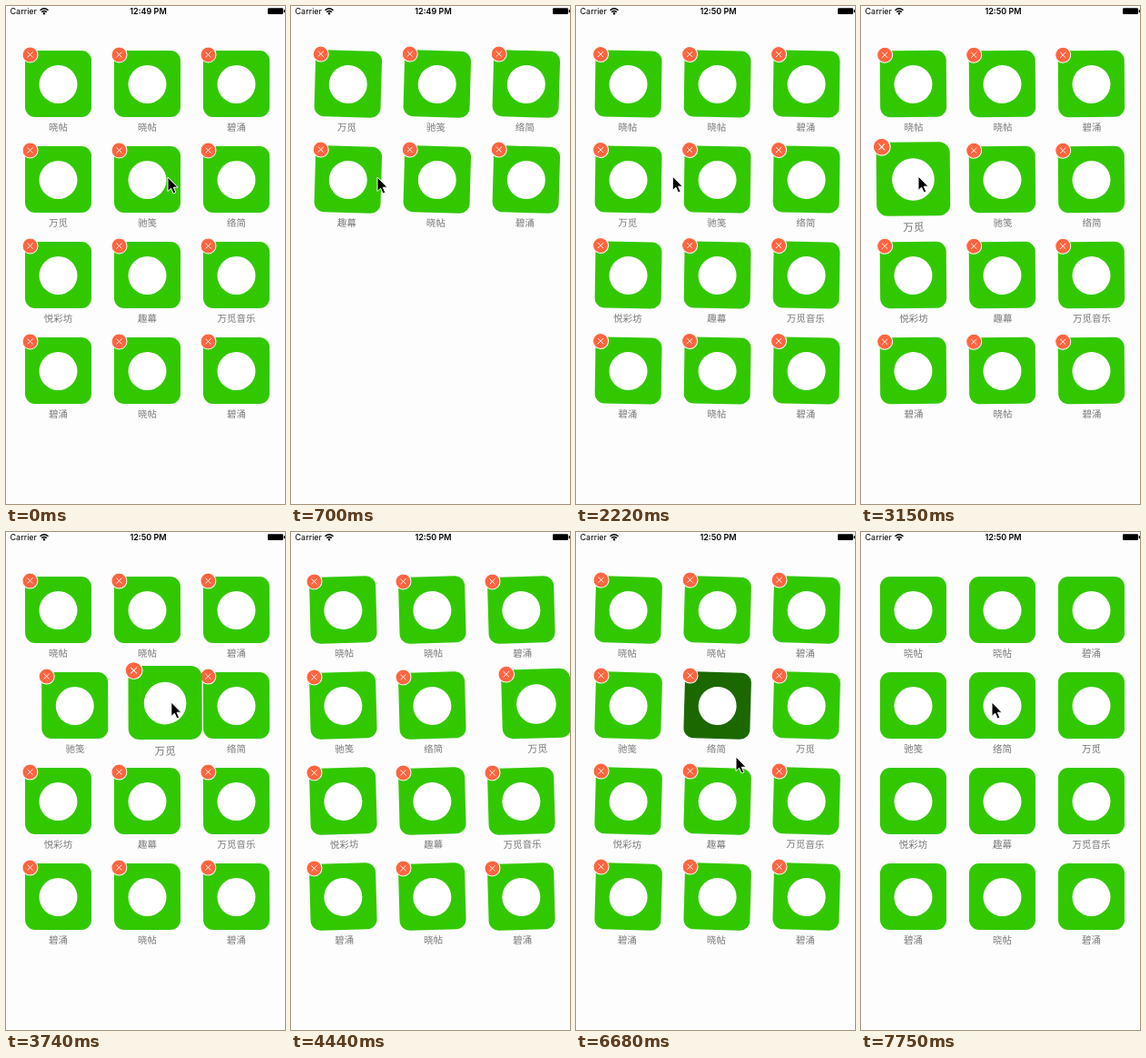
Animation, 307 px wide and 547 px high, one loop 8 s. Source, as an HTML page:

```html
<!DOCTYPE html>
<html lang="zh">
<head>
<meta charset="utf-8">
<title>Icon grid</title>
<style>
  html, body { margin: 0; width: 100%; height: 100%; overflow: hidden; background: #fdfdfd; }
  svg { display: block; width: 100%; height: 100%; }
  .status { font: 9px Inter, Roboto, sans-serif; }
  .clock { font-weight: 600; text-anchor: middle; }
  .label { font: 10.5px "Noto Sans CJK SC", "Noto Sans CJK", sans-serif; fill: #777; text-anchor: middle; }
  .tile { fill: #32c800; }
  .pressed .tile { fill: #1b6800; }
  .badge { fill: #ff6540; stroke: #fff; }
  .cross { fill: none; stroke: #fff; stroke-width: .9; }
</style>
</head>
<body>
<svg viewBox="0 0 307 547">
  <rect width="307" height="547" fill="#fdfdfd"/>
  <g id="grid"></g>
  <g class="status">
    <text x="4.5" y="9">Carrier</text>
    <text class="clock" id="clock" x="156.5" y="9"></text>
    <g fill="none" stroke="#000" stroke-width="1.4">
      <path d="M37.5 4.8Q42 .8 46.5 4.8M39.2 6.6Q42 4.2 44.8 6.600"/>
      <circle cx="42" cy="8.2" r=".6"/>
    </g>
    <rect x="288" y="2.2" width="17" height="6.8" rx="1.2"/>
    <rect x="305.7" y="4.2" width="1.3" height="3"/>
  </g>
  <path id="cursor" d="M0 0V15.5L3.6 12.2L6.2 18L8.8 16.9L6.3 11.2H11Z" stroke="#fff"/>
</svg>
<script>
const LOOP = 8000, PAGE_WIDTH = 310;
const WIGGLE = { period: 299, degrees: 2 };
const EDIT_END = 7000;
const LIFT = 2700, DRAG = 3300, DRAG_END = 4200, DROP = 4320;
const DRAG_END_X = 300, DRAG_RISE = 5;

const firstPage = ["晓帖", "晓帖", "碧涌", "万觅", "驰笺", "络简",
                   "悦彩坊", "趣幕", "万觅音乐", "碧涌", "晓帖", "碧涌"];
const secondPage = ["万觅", "驰笺", "络简", "趣幕", "晓帖", "碧涌"];

// Cursor tip: time, x, y
const cursorPath = [
  [110, 178, 188], [380, 95, 188], [940, 95, 188], [1220, 215, 187],
  [1800, 215, 187], [2450, 63, 187], [DRAG, 63, 187], [DRAG_END, 308, 187],
  [4700, 308, 187], [5350, 140, 185], [5800, 140, 185], [6500, 176, 247],
  [7050, 176, 247], [7750, 144, 187]
];

const byId = id => document.getElementById(id);
const clamp = v => Math.max(0, Math.min(1, v));
const mix = (a, b, p) => a + (b - a) * p;
const progress = (t, start, end) => clamp((t - start) / (end - start));
const smooth = p => p * p * (3 - 2 * p);
const easeOut = p => 1 - (1 - p) ** 2;

function makeIcon(name, slot, page) {
  const node = document.createElementNS("http://www.w3.org/2000/svg", "g");
  node.innerHTML = `
    <rect class="tile" x="-36.5" y="-41.5" width="73" height="73" rx="11"/>
    <circle cy="-4.5" r="21" fill="#fff"/>
    <text class="label" y="46.5">${name}</text>
    <g class="edit" transform="translate(-31 -37)">
      <circle class="badge" r="8.5"/>
      <path class="cross" d="M-3-3L3 3M3-3L-3 3"/>
    </g>`;
  byId("grid").append(node);
  return { node, slot, page };
}

const icons = [
  ...firstPage.map((name, i) => makeIcon(name, i, 0)),
  ...secondPage.map((name, i) => makeIcon(name, i, 1))
];
const [dragged, left, middle] = icons.slice(3, 6);
byId("grid").append(dragged.node);
const badges = document.querySelectorAll(".edit");

const slotX = slot => 57.5 + slot % 3 * 98;
const slotY = slot => 90.5 + Math.floor(slot / 3) * 105;

function scrollAt(t) {
  return t < 940
    ? -PAGE_WIDTH * smooth(progress(t, 110, 750))
    : -PAGE_WIDTH * (1 - easeOut(progress(t, 940, 1640)));
}

function cursorAt(t) {
  const next = cursorPath.findIndex(key => key[0] > t);
  if (next === 0) return cursorPath[0].slice(1);
  if (next < 0) return cursorPath.at(-1).slice(1);
  const [t0, x0, y0] = cursorPath[next - 1], [t1, x1, y1] = cursorPath[next];
  const p = smooth(progress(t, t0, t1));
  return [mix(x0, x1, p), mix(y0, y1, p)];
}

function iconPose(icon, t) {
  let x = slotX(icon.slot), y = slotY(icon.slot), scale = 1;
  if (icon === dragged) {
    const drag = smooth(progress(t, DRAG, DRAG_END));
    const drop = easeOut(progress(t, DROP, DROP + 300));
    x = mix(mix(x, DRAG_END_X, drag), slotX(5), drop);
    y -= DRAG_RISE * drag * (1 - drop);
    scale += 0.11 * smooth(progress(t, LIFT, LIFT + 200)) * (1 - drop);
  }
  if (icon === left) x -= 98 * smooth(progress(t, 3560, 3810));
  if (icon === middle) x -= 98 * smooth(progress(t, 3840, 4090));
  return { x: x + icon.page * PAGE_WIDTH + scrollAt(t), y, scale };
}

function draw(t) {
  const editing = t < EDIT_END;
  const angle = editing ? WIGGLE.degrees * Math.sin(2 * Math.PI * t / WIGGLE.period) : 0;
  for (const icon of icons) {
    const { x, y, scale } = iconPose(icon, t);
    icon.node.setAttribute("transform", `translate(${x} ${y}) rotate(${angle}) scale(${scale})`);
  }
  for (const badge of badges) badge.style.display = editing ? "" : "none";
  middle.node.classList.toggle("pressed", t >= 6640 && editing);
  byId("clock").textContent = t < 2100 ? "12:49 PM" : "12:50 PM";
  byId("cursor").setAttribute("transform", `translate(${cursorAt(t)})`);
}

const start = performance.now();
function tick() {
  draw((performance.now() - start) % LOOP);
  requestAnimationFrame(tick);
}
tick();
</script>
</body>
</html>
```
